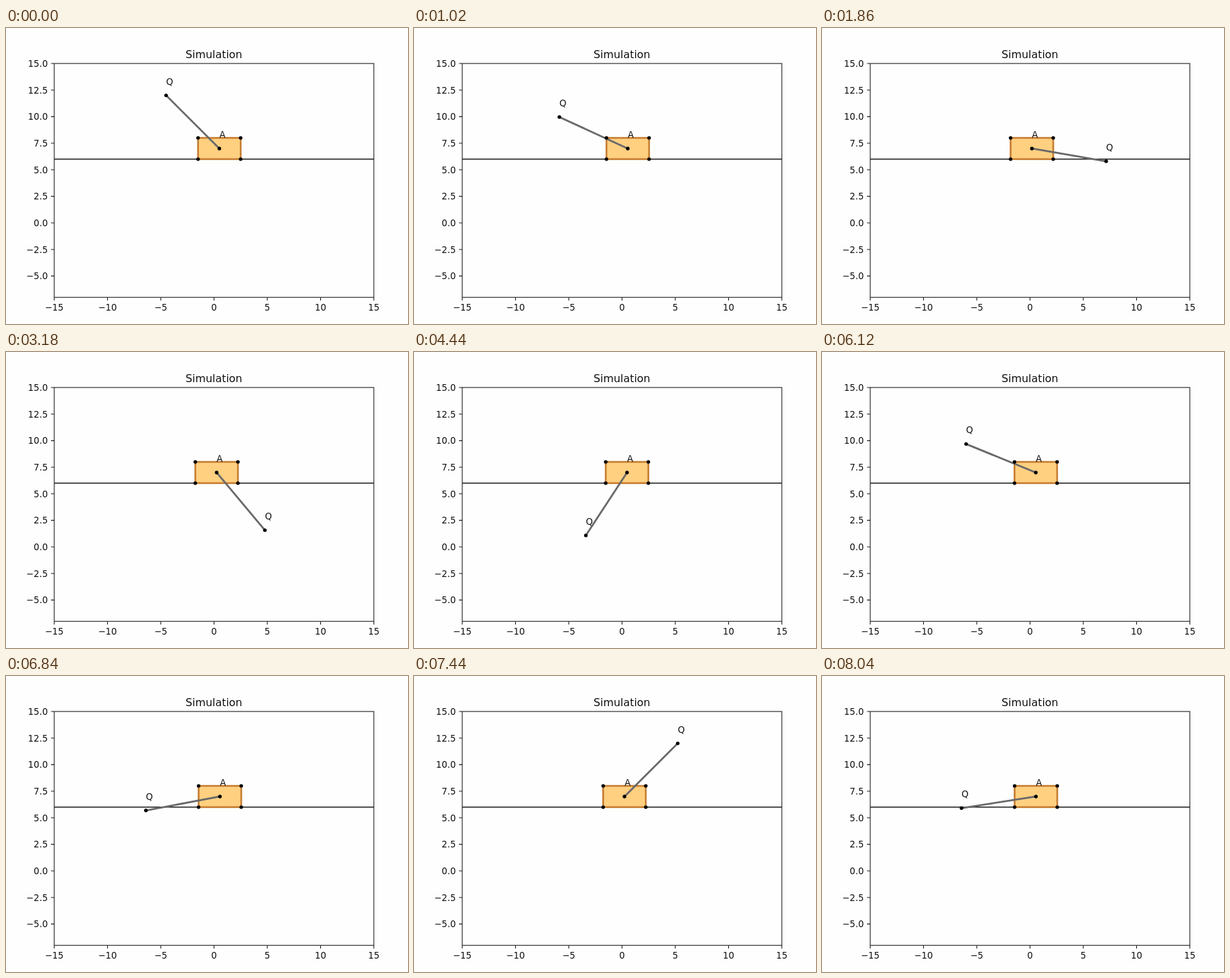
These frames come from a looping animation (600x442 px, 8.1 s). An HTML page:

```html
<!DOCTYPE html>
<html lang="en">
<head>
<meta charset="utf-8">
<title>Simulation</title>
<style>
  html, body { margin: 0; width: 100%; height: 100%; overflow: hidden; background: #fefefe; }
  svg { display: block; width: 600px; height: 442px; }
  text { font-family: "DejaVu Sans", sans-serif; font-size: 13.3px; fill: #111; }
  .title { font-size: 15.9px; text-anchor: middle; }
  .xl { text-anchor: middle; }
  .yl { text-anchor: end; }
  .axis { fill: none; stroke: #1a1a1a; stroke-width: 1.1; }
</style>
</head>
<body>
<svg id="stage" viewBox="0 0 600 442"></svg>
<script>
const stage = document.getElementById('stage');
const UX = 15.9, UY = 15.87;
const px = x => 310.5 + x * UX;
const py = y => 53 + (15 - y) * UY;

function add(tag, attrs, text) {
  const el = document.createElementNS('http://www.w3.org/2000/svg', tag);
  set(el, attrs);
  if (text !== undefined) el.textContent = text;
  stage.appendChild(el);
  return el;
}
function set(el, attrs) {
  for (const key in attrs) el.setAttribute(key, attrs[key]);
}
const label = (v, digits) => v.toFixed(digits).replace('-', '\u2212');

// Axes
add('text', { class: 'title', x: 310.3, y: 44.6 }, 'Simulation');
let ticks = '';
for (let x = -15; x <= 15; x += 5) {
  ticks += `M${px(x)} 402.2v4.8`;
  add('text', { class: 'xl', x: px(x), y: 422 }, label(x, 0));
}
for (let y = -5; y <= 15; y += 2.5) {
  ticks += `M72 ${py(y)}h-4.8`;
  add('text', { class: 'yl', x: 62.4, y: py(y) + 4.9 }, label(y, 1));
}
add('path', { class: 'axis', d: ticks });

// Moving parts
const groundY = py(6), roofY = py(8), pivotY = py(7);
add('path', { d: `M72 ${groundY}H549`, stroke: '#1a1a1a', 'stroke-width': 1.5 });
const cart = add('rect', {
  y: roofY, width: 4 * UX, height: groundY - roofY,
  fill: '#ffd080', stroke: '#c67c30', 'stroke-width': 2.6
});
const rod = add('line', { y1: pivotY, stroke: '#696969', 'stroke-width': 2.8 });
const dot = () => add('circle', { r: 2.7, fill: '#000' });
const corners = [[-2, 8], [2, 8], [-2, 6], [2, 6]].map(([x, y]) => ({ x, y, el: dot() }));
const pivot = dot(), bob = dot();
const nameA = add('text', { y: roofY }, 'A');
const nameQ = add('text', {}, 'Q');
add('rect', { class: 'axis', x: 72, y: 53, width: 477, height: 349.2 });

// Pendulum angles, measured from straight down
const START = -0.75 * Math.PI, STEP = 0.3245, SUB = 200, LAST = 84;
const angles = [START];
let angle = START, speed = 0;
for (let n = 1; n <= LAST; n++) {
  for (let i = 0; i < SUB; i++) {
    const h = STEP / SUB;
    speed -= Math.sin(angle) * h / 2;
    angle += speed * h;
    speed -= Math.sin(angle) * h / 2;
  }
  angles.push(angle);
}

// Simulation step shown at a given time; playback speeds up in three stages
function stepAt(ms) {
  const k = Math.floor(ms / 60 + 0.001);
  if (k < 11) return 0;
  if (k < 56) return Math.floor((k - 11) / 2);
  if (k < 112) {
    const j = k - 56;
    return 23 + 10 * Math.floor(j / 14) + Math.floor((j % 14 + 0.5) * 9 / 13);
  }
  return Math.min(LAST, Math.max(63, k - 50));
}

const LENGTH = 5 * Math.SQRT2, MASS_RATIO = 37;

function draw(ms) {
  const a = angles[stepAt(ms)];
  const dx = LENGTH * Math.sin(a);
  const cx = 0.5 - (dx + 5) / MASS_RATIO;
  const ax = px(cx), qx = px(cx + dx);
  const qy = py(7 - LENGTH * Math.cos(a));
  set(cart, { x: px(cx - 2) });
  for (const c of corners) set(c.el, { cx: px(cx + c.x), cy: py(c.y) });
  set(rod, { x1: ax, x2: qx, y2: qy });
  set(pivot, { cx: ax, cy: pivotY });
  set(bob, { cx: qx, cy: qy });
  set(nameA, { x: ax });
  set(nameQ, { x: qx, y: qy - UY });
}

const LOOP = 8100;
const begin = performance.now();
function tick() {
  draw((performance.now() - begin) % LOOP);
  requestAnimationFrame(tick);
}
tick();
</script>
</body>
</html>
```
